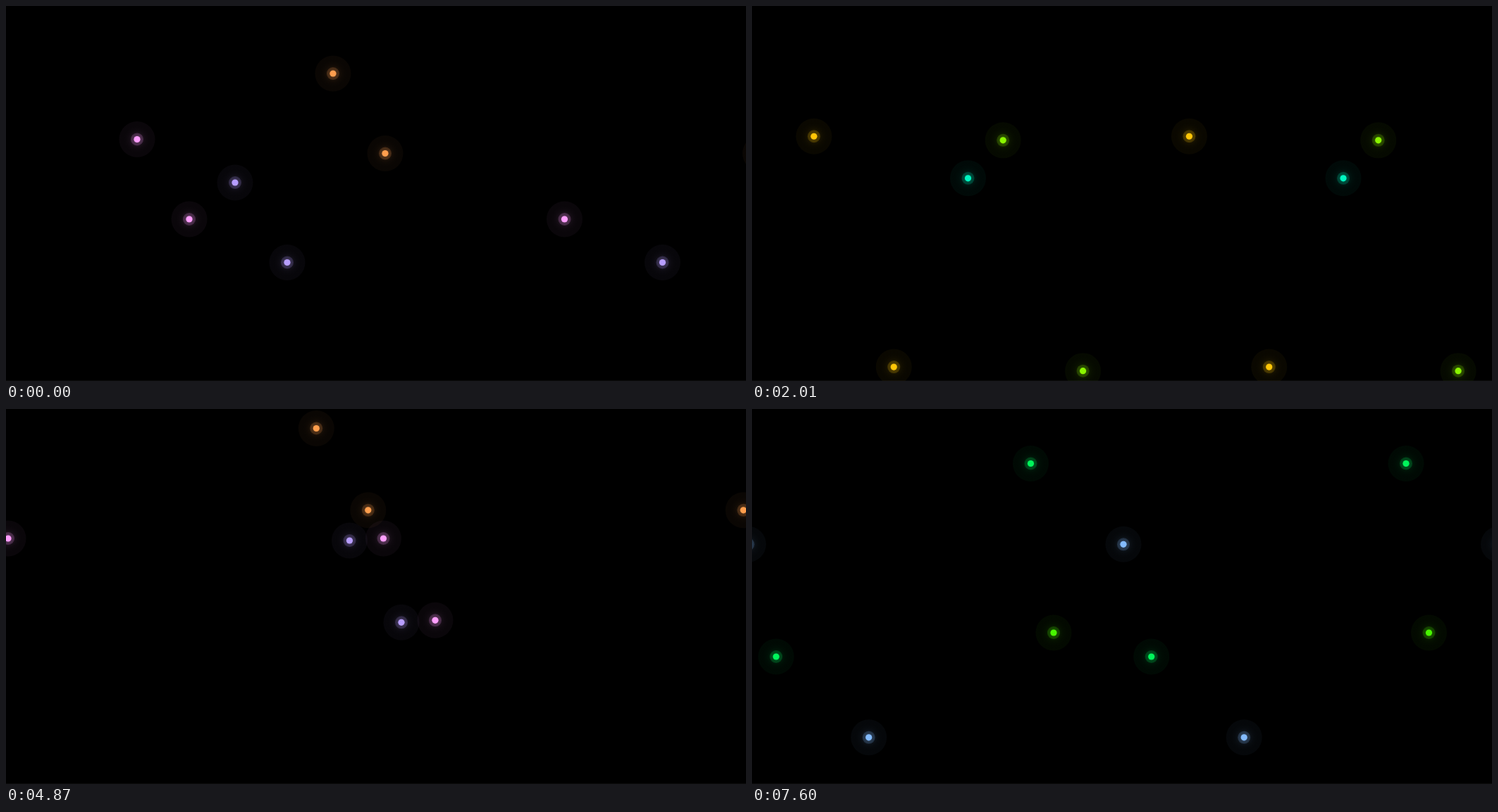
An HTML page with a canvas for the animation above (7.7 s loop, 1050 by 533 pixels).

```html
<!DOCTYPE html>
<html lang="en">
<head>
<meta charset="utf-8">
<title>Drifting lights</title>
<style>
  html, body { margin: 0; width: 100%; height: 100%; overflow: hidden; background: #000; }
  canvas { display: block; }
</style>
</head>
<body>
<canvas id="stage" width="1050" height="533"></canvas>
<script>
const ctx = document.getElementById('stage').getContext('2d');
const W = 1050, H = 533, LOOP = 7700;
const TILE = 532.5;             // horizontal repeat distance
const STEP = 143;               // pace of the coarse clock, ms
const GLOW = 25.5, RING = 9, CORE = 4.6;
const HUES = [300, 27, 260];    // starting hue of each light
const HUE_RATE = 0.074;         // degrees per ms

// Waypoints: time, x and y of the three lights, then the second layer's shift.
const path = [
  [0,    186, 189.5,  464, 96,      325, 251,       74, 113.5],
  [1280, 323, 74,     216, 197,     158.3, 226,     27.6, 417],
  [2670, 370, 281,    402.3, 255.3, 9, 124,         199.5, 234],
  [3590, 267, -143,   221, -78,     -208.5, -111,   140, 470],
  [4870, 3, 184,      440.3, 27.5,  -45, 187,       73.5, 116.3],
  [6420, 102, 282,    357, 178,     -156.5, 187.5,  -117.7, 331],
  [7600, -137, 77.5,  527, 192.3,   -104.5, 318,    -361.3, 274.5]
];

const clamp = (v, lo, hi) => Math.min(hi, Math.max(lo, v));
const smooth = v => v * v * (3 - 2 * v);
const away = (a, b) => Math.abs(((a - b) % 360 + 540) % 360 - 180);

function slope(i, col) {
  const a = path[Math.max(0, i - 1)], b = path[Math.min(path.length - 1, i + 1)];
  return 0.6 * (b[col] - a[col]) / (b[0] - a[0]);
}

// Cubic curve through the waypoints.
function curve(i, u, col) {
  const from = path[i];
  if (!u) return from[col];
  const to = path[i + 1], span = to[0] - from[0], v = 1 - u;
  return from[col] + (to[col] - from[col]) * smooth(u)
    + span * u * v * (slope(i, col) * v - slope(i + 1, col) * u);
}

// Current leg and the position along it, held on the coarse clock.
function locate(t) {
  let i = path.length - 1;
  while (path[i][0] > t) i--;
  if (i === path.length - 1) return { i, u: 0, time: path[i][0] };
  const span = path[i + 1][0] - path[i][0], n = Math.round(span / STEP);
  const u = Math.floor((t - path[i][0]) / span * n + 1e-6) / n;
  return { i, u, time: path[i][0] + u * span };
}

// Pure hues, paler towards violet; cyan is pulled back to widen the blues.
function colour(start, time) {
  const h = start + time * HUE_RATE;
  const pull = 19 * Math.max(0, Math.cos((h - 215) * Math.PI / 180)) ** 4;
  const hue = (h - pull) % 360;
  const pale = 1 - smooth(clamp((away(hue, 293) - 65) / 60, 0, 1));
  return a => `hsla(${hue}, 100%, ${48 + 33 * pale}%, ${a})`;
}

function disc(x, y, r, fill) {
  ctx.fillStyle = fill;
  ctx.beginPath();
  ctx.arc(x, y, r, 0, Math.PI * 2);
  ctx.fill();
}

function drawLight(x, y, tint) {
  const g = ctx.createRadialGradient(x, y, 0, x, y, GLOW);
  for (let r = 0; r <= 1; r += 0.125) g.addColorStop(r, tint(0.04 + 0.3 * (1 - r) ** 4));
  ctx.globalCompositeOperation = 'lighter';
  disc(x, y, GLOW, g);
  disc(x, y, RING, tint(0.16));
  ctx.globalCompositeOperation = 'source-over';
  disc(x, y, CORE, tint(1));
}

function drawRow(x, y, left, right, tint) {
  const base = ((x % TILE) + TILE) % TILE;
  for (let cx = base - TILE; cx < W + GLOW; cx += TILE) {
    if (cx >= left && cx <= right) drawLight(cx, y, tint);
  }
}

function draw(t) {
  const { i, u, time } = locate(t);
  const at = col => curve(i, u, col);
  ctx.globalCompositeOperation = 'source-over';
  ctx.fillStyle = '#000';
  ctx.fillRect(0, 0, W, H);
  ctx.fillStyle = '#0b0b0b';
  ctx.fillRect(0, H - 1, W, 1);

  // Close layers part left and right; a far second layer keeps to the left.
  const dx = at(7), dy = at(8), close = dy < 200, far = dy > 430;
  HUES.forEach((start, n) => {
    const x = at(1 + 2 * n), y = at(2 + 2 * n), tint = colour(start, time);
    drawRow(x, y, -GLOW, close ? 630 : W + GLOW, tint);
    drawRow(x + dx, y + dy, close ? 130 : -GLOW, far ? 700 : W + GLOW, tint);
  });
}

let start = null;
function tick(now) {
  if (start === null) start = now;
  draw((now - start) % LOOP);
  requestAnimationFrame(tick);
}
draw(0);
requestAnimationFrame(tick);
</script>
</body>
</html>
```
